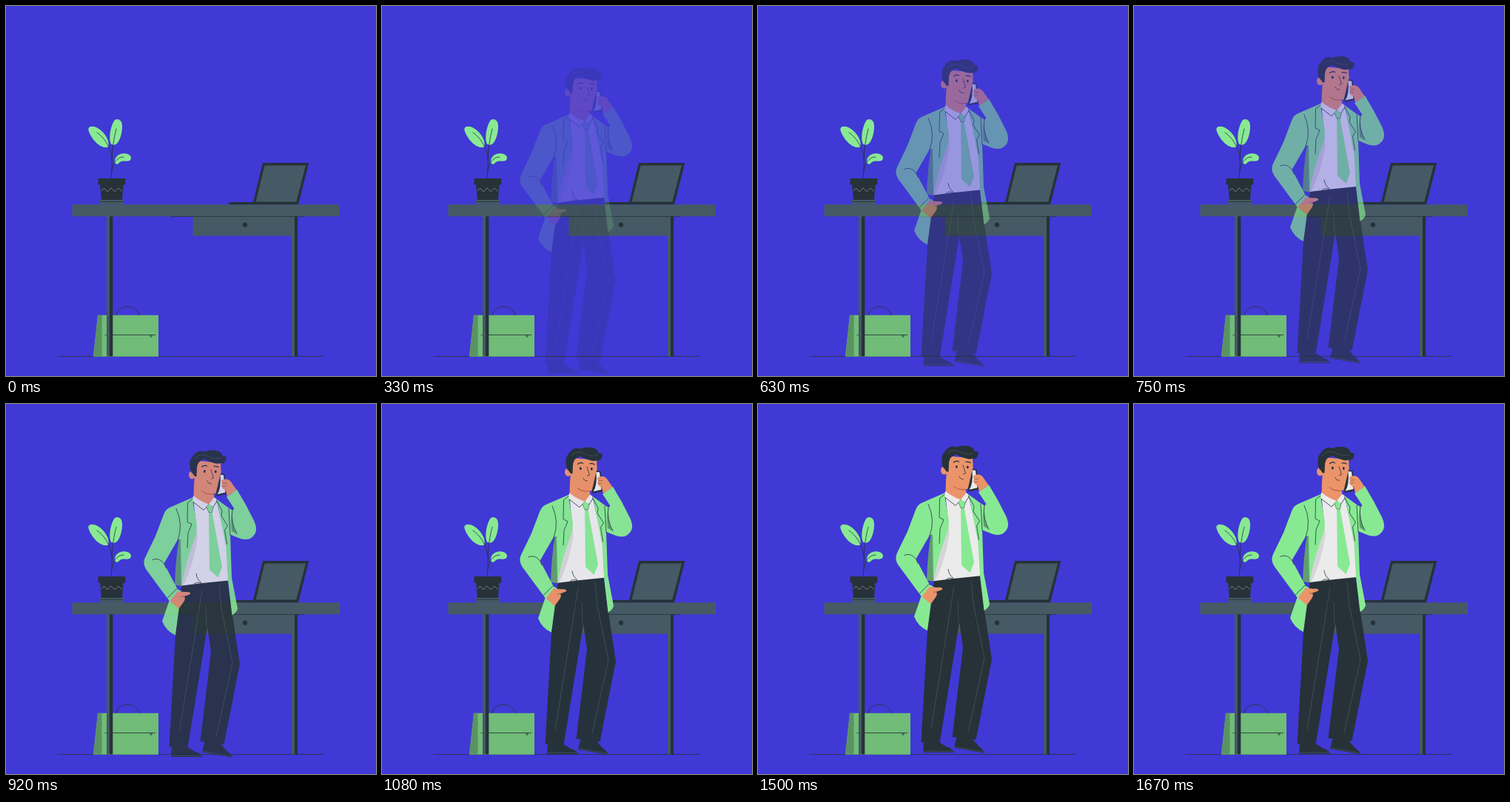
Animation of 500x500 px, one loop 1710 ms. Source, as an HTML page:

```html
<!DOCTYPE html>
<html lang="en">
<head>
<meta charset="utf-8">
<title>Office call</title>
<style>
html, body { margin: 0; width: 100%; height: 100%; overflow: hidden; background: #4039d6; }
svg { display: block; width: 100vw; height: 100vh; }
.dark { fill: #263238; }
.grey { fill: #455a64; }
.green { fill: #88e993; }
.shade { fill: #5f9f6e; }
.skin { fill: #eb946a; }
.shirt { fill: #ebebeb; }
.line { fill: none; stroke: #263238; stroke-width: .8; stroke-linecap: round; stroke-linejoin: round; }
.crease { fill: none; stroke: #455a64; stroke-width: .7; }
</style>
</head>
<body>
<svg viewBox="0 0 500 500">
  <rect width="500" height="500" fill="#4039d6"/>
  <path class="line" d="M70 473.5H429"/>

  <g id="bag">
    <path fill="#70bc78" d="M124 417.7H206V473.7H118Z"/>
    <path fill="#5a9362" d="M124 417.7H129.5V473.7H118Z"/>
    <path class="line" d="M149 417.5C151 402.500 177 402.500 180 417.500M134 444.500H202M195 444.500V447H197V444.500"/>
  </g>

  <g id="desk">
    <path class="grey" d="M136 284H140.500V473.500H136ZM386 284H390.500V473.500H386Z"/>
    <path class="dark" d="M140 284H144.300V473.500H140ZM390 284H394.200V473.500H390Z"/>
    <path class="grey" d="M252.500 284H387V310.500H252.500ZM89.500 268.300H451V284.300H89.500Z"/>
    <path class="line" d="M222 284.400H403"/>
    <circle class="dark" cx="323" cy="295.700" r="3.100"/>
  </g>

  <g id="laptop">
    <path class="dark" d="M347 212H409.300L395 268.300H303Q301 268.300 301 266.500Q301 265 303 265H334Z"/>
    <path class="grey" d="M349.500 215.500H405L392.300 264.500H337.500Z"/>
  </g>

  <g id="plant">
    <path class="green" d="M138 190.500C128 194 115 180 111.500 168C110 162 118 161.500 124 165C134 171 141 183 138 190.500Z
      M142 186.500C138 178 142 160 147 154C152 151 157.500 155 157 163C157 173 153 186 147 187.500Q144 188 142 186.500Z
      M147 212C146 203 154 198 162 199.500C170 200.500 170.500 207 167 209C161 211 156 207 152 213Q149 215 147 212Z"/>
    <path class="line" d="M142.300 232C142 222 145 211 142 200C139 188 133 178 123 171M143.300 208C143 194 146 178 149 166M143 224C145 211 150 204 159 204"/>
    <path class="dark" d="M124.500 233H161.200V241H124.500ZM127 241H158.500L157 262.500H129Z"/>
    <path class="line" d="M125 241.300H161" stroke-opacity=".5"/>
    <path class="crease" style="stroke:#8b999f" d="M129 250L132.500 246L137 251L142 246L147 251L152 246L156.500 250.500"/>
    <path class="grey" d="M126 262H160L158 268H128Z"/>
    <path class="line" d="M127 264.500H159"/>
  </g>

  <g id="man" opacity="0">
    <!-- coat interior and tail -->
    <path class="shade" d="M234 176L240 176L240 242L228 240Q229 205 234 176Z"/>
    <path class="green" d="M221 260L211 289Q216 302 229 308L240 250L232 246Z"/>
    <!-- shoes -->
    <path class="dark" d="M224 459L223 472.500H265.500Q264 468 255 465L245 459ZM269 450L265 466L306 473.300Q305 469 298 464L288 452Z"/>
    <path class="crease" d="M223 470.800H265M265.500 464.800L305.500 471.800"/>
    <!-- trousers -->
    <path class="dark" d="M238 239L299.500 233L306 281L316 347L312 367L294.500 455.500L262.500 451.500L277 331L272 296L267 328L245.500 460L220.500 459L229 308Z"/>
    <path class="crease" d="M265 247L259 285L234 440M288 240L291 272L306 345L284 445M271 296L270 268"/>
    <!-- shirt -->
    <path class="shirt" d="M253 121L284 123L298 185L300.500 234Q268 237 237.500 241L244 205L257 160Z"/>
    <path fill="#d5d5d8" d="M257 155L258.500 178Q254 210 240 240L237 240L243 206Z"/>
    <path class="line" d="M257 225Q258 233 264 237M254 239Q258 235 264 238"/>
    <!-- neck and collar -->
    <path class="skin" d="M254 104L253.500 121L274 133L281.500 123L280 112Z"/>
    <path class="shirt" d="M253.500 119.500L250.500 126L267 139L274 131Q262 127 253.500 119.500ZM274 131L278.500 137L285.500 127L281.500 121.500Z"/>
    <path class="line" d="M250.500 126L267 139L274 131L278.500 137L285 127"/>
    <!-- tie -->
    <path class="green" d="M270.500 134.500L274 131L280 134L278.500 142L292 216L286.500 230L275 219.500L274 142Z"/>
    <path class="line" stroke-opacity=".6" d="M271 135L274 142L278.500 142L280 134.500"/>
    <!-- coat, near side and sleeve -->
    <path class="green" d="M252 122L222 135Q216 137 213 145L202 174L188 203Q184 211 190 220L221 262L233 248L213.500 211L232 179L236 178L237 239L245 206L257 171L258 160L253 130Z"/>
    <path class="line" d="M230 137Q240 158 232 180M252 124L245.500 129L245 155L251 158L246 170L245 190M198 206Q207 202 214 212L216 217M218 258L231 245"/>
    <!-- coat, far side and raised sleeve -->
    <path class="green" d="M284.500 124L301 136L306 139L308.500 137L298 121L312 111Q325 132 335 153Q341 166 335 173Q329 181 317 177.500L303 172L305 230L313 272Q312 277 305.500 281L300 234L297.500 190L288 140Z"/>
    <path class="shade" d="M306 138Q304 156 311.500 171L305 167Q303 152 306 138Z"/>
    <path class="line" d="M284.500 126L292 140L291 147L299.500 160L295.500 166L298.500 185M301 137L303 173M306 138Q303 155 312 171"/>
    <!-- pocket hand -->
    <path class="skin" d="M221.500 262L232 248.500Q240 250 246 249.500Q250 250 249 252.500L241 255.500Q243 259 240 263L233.500 272Z"/>
    <path class="line" stroke-opacity=".55" d="M241 255.500L237 256"/>
    <!-- head -->
    <ellipse class="skin" cx="251.500" cy="91.500" rx="4.500" ry="5.500"/>
    <path class="skin" d="M256 72L290 75Q291.500 98 290 107Q288 118 276 117.500Q262 116 254 107Z"/>
    <path fill="none" stroke="#c5643f" stroke-width="1.200" d="M264 112.500Q271 118.500 281 117"/>
    <path class="dark" d="M250.500 88C247 79 248 70 252 67C255 61 262 57 268 60C276 57 285 57 290 61C293 63 291 67 297.500 66C298 72 296 77 290 75.500C284 78 275 73 268 70C261 72 258.500 76 258 82L257.500 93C254 95 254 90 250.500 88Z"/>
    <path class="crease" d="M255 70C261 62 268 64 275 67S287 70 291 68"/>
    <ellipse class="dark" cx="268.300" cy="86.500" rx="1.400" ry="1.900"/>
    <ellipse class="dark" cx="283.300" cy="87" rx="1.400" ry="1.900"/>
    <path class="line" style="stroke-width:1.300" d="M264.500 80.500Q268 77.500 271.500 79.500M281 80Q284 79 287 81"/>
    <path class="line" d="M277 84.500L280.500 95.500L277.500 96.500M272 99.500Q273.500 104 277.500 103"/>
    <!-- phone and hand -->
    <path class="dark" d="M290 89L295.500 90.500L299 117L285 120L283.500 117Z"/>
    <path class="shirt" d="M289.500 91L294 91.500L296.500 115L285.500 117.500Q291 110 289.500 91Z"/>
    <path class="skin" d="M291 100Q290 97.500 297 97Q302 97 305 102L311.500 111.500L299 120.500L297 112Q291.500 110 292 107Q290 105 292.500 103Q290.500 102 291 100Z"/>
    <path class="line" stroke-opacity=".5" d="M292.500 103L298 102.500M292 107L297 106.500"/>
  </g>
</svg>
<script>
const LOOP = 1710, LEAD = 40, HIDDEN = 170, RISE = 30;
const man = document.getElementById("man");

const bez = (a, b, s) => 3 * (1 - s) ** 2 * s * a + 3 * (1 - s) * s * s * b + s ** 3;

// Overshooting ease: solve the curve's time axis, then read its value.
function ease(x) {
  let lo = 0, hi = 1;
  for (let i = 0; i < 24; i++) {
    const mid = (lo + hi) / 2;
    if (bez(.36, .5, mid) < x) lo = mid; else hi = mid;
  }
  return bez(-.01, 1.38, (lo + hi) / 2);
}

function draw(t) {
  const p = ease(Math.min(1, (t + LEAD) / LOOP));
  const alpha = t < HIDDEN ? 0 : Math.max(0, Math.min(1, p));
  man.setAttribute("opacity", alpha.toFixed(4));
  man.setAttribute("transform", `translate(0 ${(RISE * (1 - p)).toFixed(3)})`);
}

const start = performance.now();
function tick() {
  draw((performance.now() - start) % LOOP);
  requestAnimationFrame(tick);
}
tick();
</script>
</body>
</html>
```
